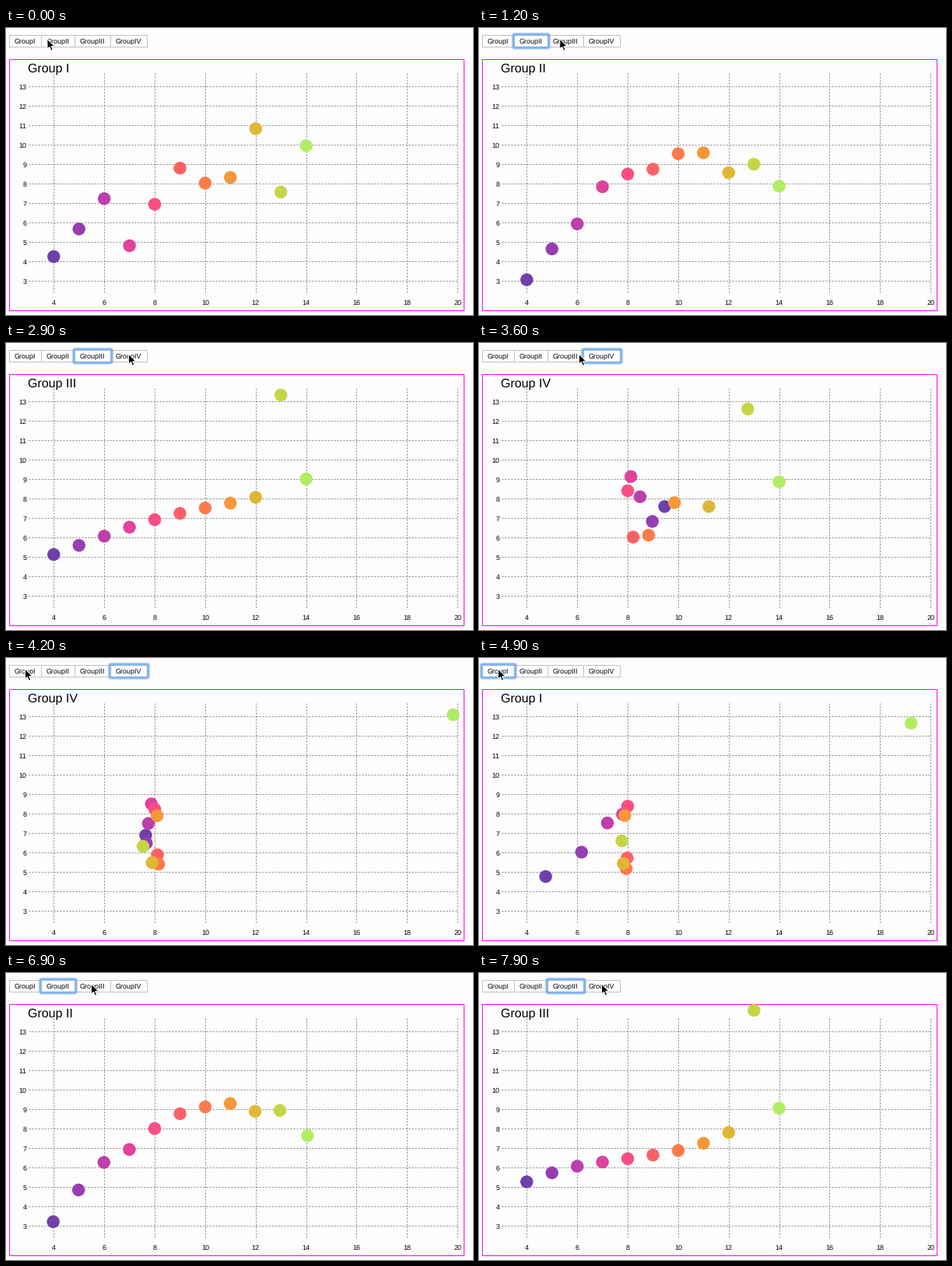
These frames come from a looping animation (600x369 px, 8 s). A matplotlib script:

```python
import matplotlib.pyplot as plt
import numpy as np
from matplotlib.animation import FuncAnimation
from matplotlib.patches import Circle, FancyBboxPatch, Polygon, Rectangle

W, H, DPI = 600, 369, 72          # at 72 dpi one point is one pixel
STEP, FRAMES = 100, 80
DURATION, STAGGER = 3000, 40
PRESS = 70                        # mouse-down leads the click
BG = "#fefdfe"
NAMES = ["I", "II", "III", "IV"]
EDGES = [4, 45, 88, 134, 181]     # button borders
CENTERS = np.add(EDGES[1:], EDGES[:-1]) / 2

plt.rcParams.update({"font.family": "Liberation Sans",
                     "text.hinting": "none", "text.hinting_factor": 1})

# The four data sets: scattered line, parabola, line with outlier, column
x = np.arange(4, 15.0)
scattered = [4.26, 5.68, 7.24, 4.82, 6.95, 8.81, 8.04, 8.33, 10.84, 7.58, 9.96]
column = [7.04, 6.58, 7.71, 8.84, 8.47, 5.76, 5.25, 7.91, 5.56, 6.89, 12.5]
POINTS = [np.column_stack(xy) for xy in (
    (x, scattered),
    (x, 9.26 - 0.1267 * (x - 10.97) ** 2),
    (x, np.where(x == 13, 12.74, 4.006 + 0.3454 * x)),
    (np.where(x == 14, 19, 8), column))]

# Pointer visits: leave, arrive, click, button
VISITS = [(0, 400, 545, 1), (850, 1320, 1955, 2), (2030, 2416, 3222, 3),
          (3470, 3900, 4716, 0), (5300, 5750, 5975, 1),
          (6500, 6950, 7189, 2), (7450, 7850, 8300, 3)]
ARROW = np.array([(0, 0), (0, 13), (3, 10.3), (5, 15.2), (7.3, 14.2),
                  (5.2, 9.6), (9.3, 9.4)])


def px(x):
    return 28.9 + 32.43 * (x - 3)


def py(y):
    return 400.4 - 25 * y


def warm(u):
    """Cubehelix sweep from violet through red to lime."""
    angle = np.radians(20 + 180 * u)
    light = 0.35 + 0.45 * u
    amp = (0.75 + 0.65 * u) * light * (1 - light)
    c, s = np.cos(angle), np.sin(angle)
    rgb = light + amp * np.array([-0.14861 * c + 1.78277 * s,
                                  -0.29227 * c - 0.90649 * s, 1.97294 * c])
    return np.clip(rgb, 0, 1)


def elastic(u):
    return 1 - 2 ** (-10 * u) * np.cos(2 * np.pi * u / 0.3)


def smooth(u):
    u = np.clip(u, 0, 1)
    return u * u * (3 - 2 * u)


def spot(i, t, k=len(VISITS) - 1):
    """Data position of dot i; each transition takes over from the last one."""
    if k < 0:
        return POINTS[0][i]
    _, _, click, group = VISITS[k]
    begin = click + STAGGER * i
    if t < begin:
        return spot(i, t, k - 1)
    start = spot(i, begin, k - 1)
    u = min((t - begin) / DURATION, 1)
    return start + (POINTS[group][i] - start) * elastic(u)


def current(t, lead=0, default=None):
    past = [g for _, _, click, g in VISITS if click - lead <= t]
    return past[-1] if past else default


def pointer_x(t):
    tip = 53
    for leave, arrive, _, button in VISITS:
        tip += (CENTERS[button] - tip) * smooth((t - leave) / (arrive - leave))
    return tip


fig = plt.figure(figsize=(W / DPI, H / DPI), dpi=DPI, facecolor=BG)
ax = fig.add_axes([0, 0, 1, 1])
ax.set_xlim(0, W)
ax.set_ylim(H, 0)
ax.axis("off")

# Chart frame and grid
ax.add_patch(Rectangle((4, 40), 584, 323, fill=False, ec="#ff00ff", lw=1,
                       zorder=1))
clip = Rectangle((4, 39), 585, 325, transform=ax.transData)
grid = dict(color="#858585", lw=1, ls=(0, (2, 2)), dash_capstyle="butt",
            zorder=2)
label = dict(size=9, color="black", va="baseline")
for v in range(4, 21, 2):
    ax.plot([px(v)] * 2, [58, 342], **grid)
    ax.text(px(v), 355.7, str(v), ha="center", **label)
for v in range(3, 14):
    ax.plot([29, 580], [py(v)] * 2, **grid)
    ax.text(26.8, py(v) + 3.2, str(v), ha="right", **label)
title = ax.text(28.5, 57, "", size=16, color="black", va="baseline")

dots = []
for u in np.linspace(0, 1, len(x)):
    dot = ax.add_patch(Circle((0, 0), 8.2, fc=warm(u), lw=0, zorder=4))
    dot.set_clip_path(clip)
    dots.append(dot)

# Buttons, their focus rings and the pointer
rings = []
for name, a, b, mid in zip(NAMES, EDGES, EDGES[1:], CENTERS):
    ax.add_patch(Rectangle((a, 9), b - a, 15, fc="white", ec="#c2c2c2", lw=1,
                           zorder=5))
    ax.text(mid, 20, "Group" + name, size=9.2, ha="center", va="baseline",
            color="black", zorder=8)
    rings.append([
        ax.add_patch(FancyBboxPatch(
            (a, 9), b - a + 1, 15.5, fill=False, ec="#6fabee",
            boxstyle="round,pad=1,rounding_size=2", lw=lw, alpha=alpha,
            zorder=7))
        for lw, alpha in ((4.6, 0.35), (2.4, 0.8))])
pointer = ax.add_patch(Polygon(ARROW, closed=True, fc="black", ec="white",
                               lw=1, joinstyle="miter", zorder=9))


def update(n):
    t = n * STEP
    for i, dot in enumerate(dots):
        dx, dy = spot(i, t)
        dot.center = px(dx), py(dy)
    title.set_text("Group " + NAMES[current(t, default=0)])
    focus = current(t, PRESS)
    for k, ring in enumerate(rings):
        for part in ring:
            part.set_visible(k == focus)
    pointer.set_xy(ARROW + [pointer_x(t), 14])
    return dots + [title, pointer]


anim = FuncAnimation(fig, update, frames=FRAMES, interval=STEP, repeat=True,
                     repeat_delay=0, blit=False)
plt.show()
```
